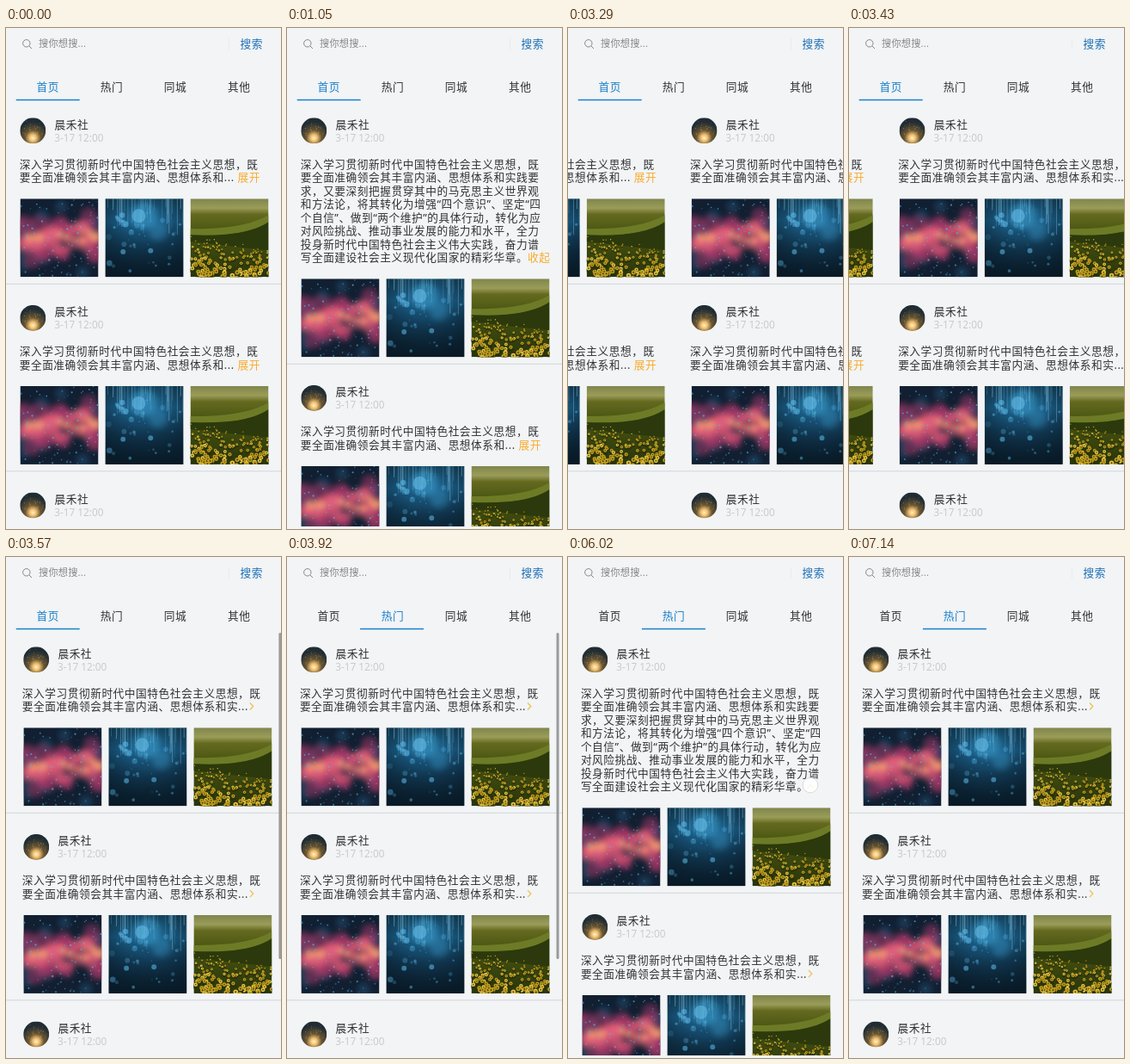
Animation of 320 by 582 pixels, one loop 7.21 s. Source, as an HTML page:

```html
<!DOCTYPE html>
<html lang="zh-CN">
<head>
<meta charset="utf-8">
<style>
html, body { margin: 0; width: 100%; height: 100%; overflow: hidden; background: #f2f4f6; }
svg.stage { display: block; width: 320px; height: 582px; }
text { font: 12.7px "Noto Sans", "Noto Sans CJK SC", "Noto Sans CJK", sans-serif; letter-spacing: .54px; fill: #303234; white-space: pre; }
.date { font-size: 11.8px; letter-spacing: 0; fill: #c9cbce; }
.hint { font-size: 11.2px; letter-spacing: .2px; fill: #85878a; }
.link { fill: #f9ab2d; }
.blue { fill: #1c80c8; }
.search { fill: #1c6fb4; font-weight: 500; }
#tabs text { text-anchor: middle; font-weight: 500; }
</style>
</head>
<body>
<svg class="stage" viewBox="0 0 320 582">
  <defs>
    <linearGradient id="night" x2="0" y2="1">
      <stop offset="0" stop-color="#174a66"/>
      <stop offset=".28" stop-color="#1b608a"/>
      <stop offset=".6" stop-color="#123c58"/>
      <stop offset="1" stop-color="#0a1d2b"/>
    </linearGradient>
    <radialGradient id="shade" cy=".3" r=".75">
      <stop offset=".3" stop-color="#081824" stop-opacity="0"/>
      <stop offset="1" stop-color="#081824" stop-opacity=".75"/>
    </radialGradient>
    <linearGradient id="field" x2="0" y2="1">
      <stop offset="0" stop-color="#7f854c"/>
      <stop offset=".12" stop-color="#9a9c58"/>
      <stop offset=".2" stop-color="#64691f"/>
      <stop offset=".45" stop-color="#465310"/>
      <stop offset="1" stop-color="#2a340b"/>
    </linearGradient>
    <radialGradient id="spark" cx=".5" cy=".78" r=".62">
      <stop offset="0" stop-color="#fff4cc"/>
      <stop offset=".2" stop-color="#f0c070"/>
      <stop offset=".48" stop-color="#6a5530"/>
      <stop offset="1" stop-color="#202c33"/>
    </radialGradient>
    <filter id="soft"><feGaussianBlur stdDeviation="3"/></filter>
    <clipPath id="list"><rect width="320" height="579"/></clipPath>
    <symbol id="p0" viewBox="0 0 91 91"></symbol>
    <symbol id="p1" viewBox="0 0 91 91"></symbol>
    <symbol id="p2" viewBox="0 0 91 91"></symbol>
    <symbol id="face" viewBox="0 0 30 30"></symbol>
  </defs>
  <rect width="320" height="582" fill="#f2f4f6"/>
  <g clip-path="url(#list)">
    <g id="home"></g>
    <g id="hot"></g>
  </g>
  <g fill="none" stroke="#85878a">
    <circle cx="23.8" cy="17.8" r="4.2"/>
    <path d="M26.9 20.9L30 24"/>
    <path d="M259.5 12V25" stroke="#e9ebed"/>
  </g>
  <text class="hint" x="38" y="22.3">搜你想搜...</text>
  <text class="search" x="272.5" y="22.8">搜索</text>
  <g id="tabs"></g>
  <rect id="bar" y="82.8" width="74" height="1.5" class="blue"/>
  <circle id="touch" r="8.8" fill="#fff" fill-opacity=".85" stroke="#d9dbdd"/>
</svg>
<script>
const LOOP = 7210, PITCH = 217.6, LINE = 15.5;
const $ = id => document.getElementById(id);
const clamp = v => Math.max(0, Math.min(1, v));

let seed = 11;
const rnd = (a, b) => {
  seed = seed * 16807 % 2147483647;
  return a + (b - a) * seed / 2147483647;
};
const many = (n, fn) => Array.from({ length: n }, (_, i) => fn(i)).join('');
const dot = (x, y, r, fill, alpha = 1) =>
  `<circle cx="${x}" cy="${y}" r="${r}" fill="${fill}" opacity="${alpha}"/>`;
const box = fill => `<rect width="91" height="91" fill="${fill}"/>`;
const soft = shapes => `<g filter="url(#soft)">${shapes}</g>`;

// Soft blobs scattered along a gently rising band.
const band = (n, spread, r, fill, alpha) => many(n, () => {
  const x = rnd(0, 91);
  return dot(x, 51 - x * .1 + rnd(-spread, spread), rnd(r / 2, r), fill, alpha);
});

function paintPhotos() {
  $('p0').innerHTML = box('#111f31') +
    soft(many(16, () => dot(rnd(0, 91), rnd(0, 91), rnd(4, 9), '#1d4d70', .55)) +
      band(34, 23, 12, '#a83868', .5) + band(26, 12, 8, '#e8607c', .6) +
      band(12, 5, 5, '#f9a070', .8)) +
    many(120, () => dot(rnd(0, 91), rnd(0, 91), rnd(.4, 1.3), '#55b4e4', rnd(.2, .8)));
  $('p1').innerHTML = box('url(#night)') +
    soft(dot(45, 20, 15, '#3c9ccc', .55) + dot(62, 38, 11, '#3c9ccc', .35)) +
    box('url(#shade)') +
    many(42, () => `<rect x="${rnd(0, 91)}" width="${rnd(.4, 1.2)}" height="${rnd(8, 42)}" fill="#8bd0f2" opacity="${rnd(.12, .45)}"/>`) +
    dot(39, 20, 8, '#6cc4ee', .5) +
    many(40, () => dot(rnd(4, 87), rnd(14, 84), rnd(.6, 3.6), '#5cbcec', rnd(.15, .6)));
  $('p2').innerHTML = box('url(#field)') +
    '<path d="M0 35Q62 36 91 19V27Q65 45 0 43Z" fill="#6d7b26"/>' +
    '<path d="M0 42Q65 45 91 27V60L0 50Z" fill="#2c390c"/>' +
    many(150, i => {
      const k = i / 149, x = rnd(0, 91), top = 45 + x * .14;
      const y = top + (91 - top) * k + rnd(-2, 2), r = .7 + 2.1 * k;
      return dot(x, y + r, r * 1.3, '#27320a') +
        dot(x, y, r, i % 3 ? '#bd9c1e' : '#e3c341') + dot(x, y, r * .35, '#4a390c');
    });
  $('face').innerHTML = '<circle cx="15" cy="15" r="15" fill="url(#spark)"/>' +
    many(34, () => {
      const a = rnd(0, 6.28), d = rnd(3, 14);
      return dot(15 + d * Math.cos(a), 15 + d * Math.sin(a), rnd(.3, .8), '#c9bd9c', rnd(.2, .7));
    });
}

const FULL = [
  '深入学习贯彻新时代中国特色社会主义思想，既',
  '要全面准确领会其丰富内涵、思想体系和实践要',
  '求，又要深刻把握贯穿其中的马克思主义世界观',
  '和方法论，将其转化为增强“四个意识”、坚定“四',
  '个自信”、做到“两个维护”的具体行动，转化为应',
  '对风险挑战、推动事业发展的能力和水平，全力',
  '投身新时代中国特色社会主义伟大实践，奋力谱',
  '写全面建设社会主义现代化国家的精彩华章。'
];
const GROW = LINE * (FULL.length - 2);

function post(y, hot, open) {
  const lines = open ? FULL : [FULL[0], FULL[1].slice(0, hot ? 19 : 18) + '...'];
  const shift = open ? GROW : 0, mid = 173.5 + shift;
  const toggle = hot
    ? `<path d="${open ? `M278.5 ${mid + 2}l3.5-4 3.5 4` : `M280 ${mid - 4}l3.8 4-3.8 4`}" fill="none" stroke="#efc04c" stroke-width="1.3"/>`
    : `<text class="link" x="${open ? 280 : 269.5}" y="${mid + 4.8}">${open ? '收起' : '展开'}</text>`;
  return `<g transform="translate(0 ${y})">
    <use href="#face" x="16.3" y="104.3" width="30" height="30"/>
    <text x="56.5" y="116.8">晨禾社</text>
    <text class="date" x="56.2" y="131.5">3-17 12:00</text>
    ${lines.map((s, i) => `<text x="${hot ? 14.9 : 15.7}" y="${162.8 + i * LINE}">${s}</text>`).join('')}
    ${toggle}
    ${many(3, i => `<use href="#p${i}" x="${16.5 + 99 * i}" y="${198.3 + shift}" width="91" height="91"/>`)}
    <path d="M0 ${297.3 + shift}H320" stroke="#d3d5d8"/>
  </g>`;
}

function showPage(id, open, scrollbar) {
  const g = $(id), key = `${open}${scrollbar}`, hot = id === 'hot';
  if (g.dataset.key === key) return;
  g.dataset.key = key;
  const grow = open ? GROW : 0;
  g.innerHTML = post(0, hot, open) + post(PITCH + grow, hot, false) + post(2 * PITCH + grow, hot, false) +
    (scrollbar ? '<rect x="313.5" y="88" width="3" height="379" rx="1.5" fill="#989a9c"/>' : '');
}

// Finger drag, then a decelerating settle after release.
function pageOffset(t) {
  if (t < 3290) return 320 - 192 * clamp((t - 3080) / 210);
  return 128 * Math.pow(1 - clamp((t - 3290) / 350), 2.15);
}

// start, end, x, y
const TOUCHES = [
  [700, 910, 282, 172], [1820, 1960, 292, 265],
  [4900, 5110, 281, 172], [5950, 6090, 282, 265]
];

function draw(t) {
  const off = pageOffset(t), within = (a, b) => t >= a && t < b;
  showPage('home', within(910, 1960), false);
  showPage('hot', within(5110, 6090), t < 5110);
  $('home').setAttribute('transform', `translate(${off - 320} 0)`);
  $('hot').setAttribute('transform', `translate(${off} 0)`);

  const u = clamp((t - 3640) / 300);
  $('bar').setAttribute('x', 11.7 + 74.2 * u * u * (3 - 2 * u));
  [...$('tabs').children].forEach((tab, i) =>
    tab.classList.toggle('blue', i === (t < 3640 ? 0 : 1)));

  const hit = TOUCHES.find(([a, b]) => within(a, b));
  $('touch').style.display = hit ? '' : 'none';
  if (hit) $('touch').setAttribute('transform', `translate(${hit[2]} ${hit[3]})`);
}

paintPhotos();
$('tabs').innerHTML = ['首页', '热门', '同城', '其他']
  .map((s, i) => `<text x="${48.7 + 74.2 * i}" y="73.3">${s}</text>`).join('');

const start = performance.now();
function tick() {
  draw((performance.now() - start) % LOOP);
  requestAnimationFrame(tick);
}
tick();
</script>
</body>
</html>
```
